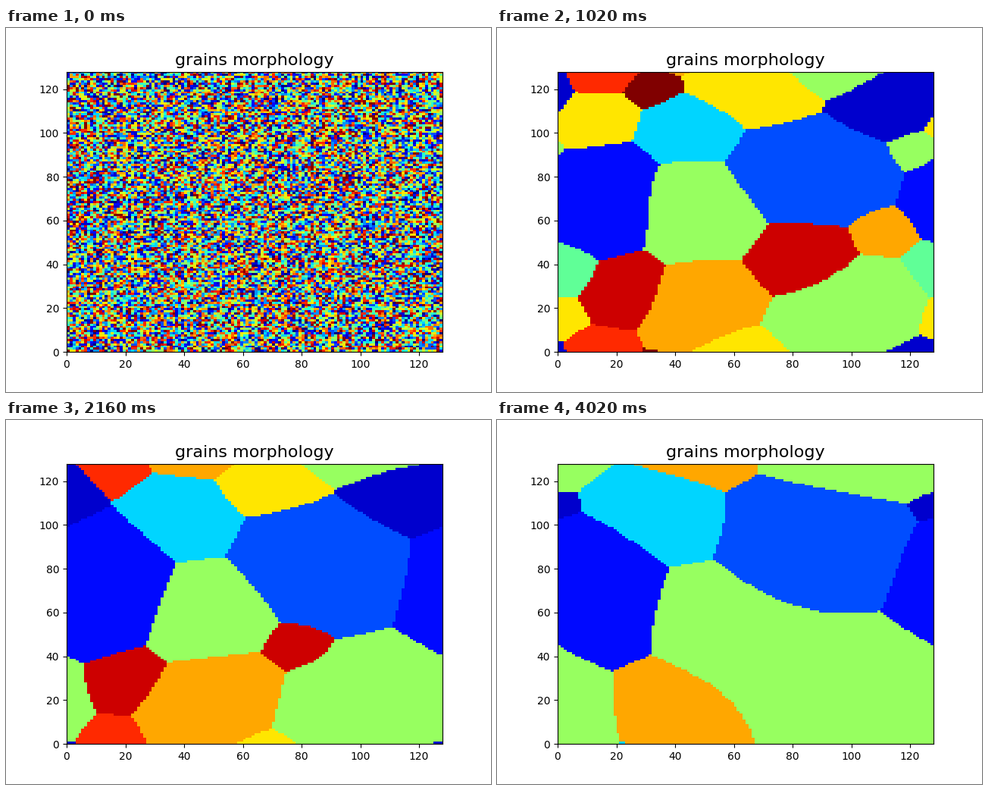
Recreate the animation shown at these times as a matplotlib script. Size 640 by 480 pixels, loop 4080 ms.

```python
import numpy as np
import matplotlib.pyplot as plt
from matplotlib.animation import FuncAnimation

N, LEVELS, FRAMES = 128, 16, 68
SETTLED = 5      # frame at which the noise has condensed into the grains below
MOBILITY = 19    # boundary speed per unit of curvature, cells^2 per frame
SUBSTEPS = 4

# Circles (x, y, radius) inscribed in the first grains, by orientation level
GRAINS = {
    1: [(118, 121.5, 10), (101, 112.5, 8), (28, 96, 8)],
    2: [(17, 80, 13), (14, 65, 14.5), (48, 42, 4.5), (117, 7.5, 4)],
    3: [(70, 84, 12.5), (88, 82, 12), (104, 80, 8.5)],
    5: [(48, 100, 14), (60, 101, 7), (120, 105.5, 7)],
    7: [(28.5, 5, 8), (96, 68, 3.8), (2, 34, 9.5), (0, 45, 9.5),
        (68.5, 21.5, 6.5)],
    8: [(46, 69, 15.5), (39, 79, 9), (51, 56, 9), (94, 8, 18),
        (111, 33, 10.5), (91, 124, 7), (124, 89.5, 11), (3, 90, 5)],
    9: [(73, 101.5, 5)],
    10: [(12, 105, 12), (64, 124, 13.5), (77, 115, 9), (90, 60, 6),
         (64, 40.5, 8.5), (124.5, 16.5, 7.5), (7, 16, 8.5)],
    11: [(104, 96, 8), (110, 56.5, 10.5), (49, 21.5, 14)],
    12: [(20, 44.5, 7.5)],
    13: [(13, 127, 10.5), (1, 3, 5), (41, 125, 6), (87, 103, 7.7),
         (117, 70, 7.5), (33.5, 48, 6.5)],
    14: [(25, 27, 11.5), (87, 40, 15.5)],
    15: [(30, 115, 9.5), (0, 74.5, 4), (72.5, 61, 9.5)],
}

rng = np.random.default_rng(7)
centres = np.arange(N) + 0.5
fx, fy = np.fft.rfftfreq(N), np.fft.fftfreq(N)[:, None]


def blur(fields, sigma):
    """Periodic Gaussian blur of every level's field."""
    kernel = np.exp(-2 * (np.pi * sigma) ** 2 * (fx ** 2 + fy ** 2))
    return np.fft.irfft2(np.fft.rfft2(fields) * kernel, s=(N, N))


def depth(x, y, radius):
    """Distance inside a circle on the periodic grid."""
    dx, dy = ((centres - c + N / 2) % N - N / 2 for c in (x, y))
    return radius - np.hypot(dx, dy[:, None])


def history():
    """Yield the level of every cell, frame by frame."""
    yield rng.integers(0, LEVELS, (N, N))

    score = np.full((LEVELS, N, N), -float(N))
    for level, circles in GRAINS.items():
        score[level] = np.max([depth(*c) for c in circles], axis=0)

    # Coarsening noise gives way to the settled grains
    noise = rng.normal(size=score.shape)
    for i in range(1, SETTLED):
        rough = blur(noise, 2.4 * i ** 0.5)
        weight = 2 * (SETTLED - i) / i
        yield (score.clip(-6, 6) + weight * rough / rough.std()).argmax(0)

    # Curvature flow: diffuse each level, then sharpen the boundaries
    share = (np.arange(LEVELS)[:, None, None] == score.argmax(0)).astype(float)
    sigma = (2 * MOBILITY / SUBSTEPS) ** 0.5
    for _ in range(SETTLED, FRAMES):
        yield share.argmax(0)
        for _ in range(SUBSTEPS):
            share = blur(share, sigma) ** 2
            share /= share.sum(0)


frames = list(history())

plt.rcParams["text.kerning_factor"] = 6
fig, ax = plt.subplots(figsize=(6.4, 4.8), dpi=100)
mesh = ax.pcolormesh(frames[0], cmap="jet", vmin=0, vmax=LEVELS - 1)
ax.set_title("grains morphology", fontsize=16)


def update(i):
    mesh.set_array(frames[i])
    return [mesh]


anim = FuncAnimation(fig, update, frames=FRAMES, interval=60, repeat=True,
                     repeat_delay=0)
plt.show()
```
